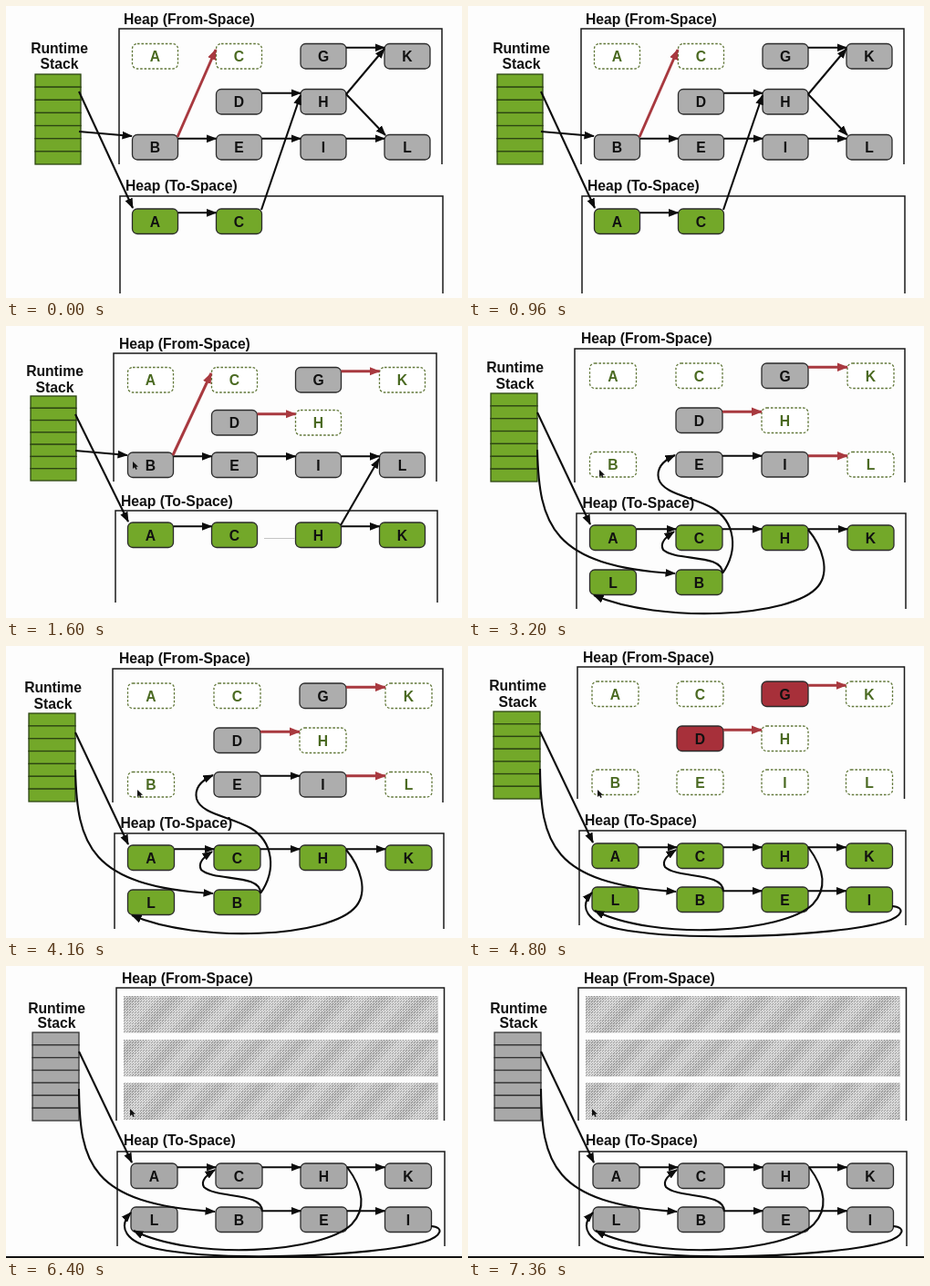
Recreate the animation shown at these times as an HTML page. Size 500x321 px, loop 8000 ms.

```html
<!DOCTYPE html>
<html lang="en">
<head>
<meta charset="utf-8">
<title>Copying collector</title>
<style>
  html, body { margin: 0; width: 100%; height: 100%; overflow: hidden; background: #fdfdfd; }
  svg { display: block; width: 100%; height: 100%; }
  text { font: bold 15.7px "Liberation Sans", Arial, sans-serif; fill: #111; }
  .mid { text-anchor: middle; }
  .frame { fill: none; stroke: #1a1a1a; stroke-width: 1.5; }
  .arrow { fill: none; stroke: #0c0c0c; stroke-width: 2.1; marker-end: url(#tip); }
  .arrow.red { stroke: #a8393f; stroke-width: 3; marker-end: url(#redTip); }
  .box { stroke: #2b2b2b; stroke-width: 1.3; }
  .moved { fill: #fff; stroke: #62783a; stroke-width: 1.3; stroke-dasharray: 2.6 1.8; }
  .ghost { fill: #4b6a22; }
</style>
</head>
<body>
<svg id="stage" viewBox="0 0 500 321" preserveAspectRatio="none">
  <defs>
    <marker id="tip" markerUnits="userSpaceOnUse" markerWidth="12" markerHeight="10" refX="10.5" refY="5" orient="auto">
      <path d="M0 .6L11.5 5L0 9.4Z" fill="#0c0c0c"/>
    </marker>
    <marker id="redTip" markerUnits="userSpaceOnUse" markerWidth="13" markerHeight="11" refX="11" refY="5.5" orient="auto">
      <path d="M0 .8L12 5.5L0 10.2Z" fill="#a8393f"/>
    </marker>
    <pattern id="fine" width="3" height="3" patternUnits="userSpaceOnUse">
      <rect width="3" height="3" fill="#cfcfcf"/>
      <path d="M0 0H1V1H0ZM1 2H2V3H1Z" fill="#8c8c8c"/>
    </pattern>
    <pattern id="streak" width="34" height="34" patternUnits="userSpaceOnUse" patternTransform="rotate(42)">
      <rect width="12" height="34" fill="#fff" opacity=".16"/>
      <rect x="20" width="8" height="34" fill="#555" opacity=".08"/>
    </pattern>
  </defs>
</svg>
<script>
const STEP = 1600;
const GREEN = '#73a829', GRAY = '#adadad', RED = '#a7303a', DULL = '#a8a8a8';
const stage = document.getElementById('stage');

function add(parent, tag, attrs, label) {
  const el = document.createElementNS('http://www.w3.org/2000/svg', tag);
  for (const key in attrs) el.setAttribute(key, attrs[key]);
  if (label) el.textContent = label;
  parent.append(el);
  return el;
}

// from/to: [left, top, right, bottom]; stack: [x, y, width, height]
// grid: three from-space rows, then to-space rows; lowercase cells have moved
const last = {
  from: [120, 23, 478.5, 168], to: [122, 203, 480, 307],
  title: [126, 17.5], toTitle: [128, 196.5],
  stack: [28, 72, 51, 96], label: [54.5, 49, 66.5],
  cols: [136, 229, 322, 414.5], rows: [39, 88, 136, 217, 265], w: 51,
  grid: ['acGk', '-Dh-', 'beil', 'ACHK', 'LBEI'],
  links: 'ACHBE', redLinks: 'GD', hot: 'GD', cursor: [142, 158],
  paths: [
    'M79 94L137 216',
    'M79 135C80 215 90 262 228 270',
    'M280 270C280 248 230 256 216 243C212 236 219 230 228 224',
    'M373 221C390 244 395 266 378 284C345 316 205 324 139 291',
    'M465 286C480 287 477 297 458 303C400 320 235 325 165 311C130 304 121 287 136 271'
  ]
};

const scenes = [
  {
    from: [124, 25, 478, 174], to: [125, 209, 479, 316],
    title: [129, 19.5], toTitle: [131, 202.5],
    stack: [32, 75, 50, 99], label: [58.5, 52, 69],
    cols: [138.5, 230.5, 323, 415], rows: [41.5, 91.5, 141.5, 223], w: 50,
    grid: ['acGK', '-DH-', 'BEIL', 'AC--'],
    links: 'GDBEIA', redLinks: '',
    paths: ['M80 94L139 222', 'M80 138L138 143', 'M373 97L415 47',
            'M373 97L416 142', 'M280 224L323 98'],
    redPaths: ['M188 144L230 48']
  },
  {
    from: [118, 30, 472, 171], to: [120, 203, 473, 304],
    title: [124, 24.5], toTitle: [126, 197.5],
    stack: [27, 77, 50, 93], label: [53.5, 55, 73],
    cols: [133.5, 225.5, 317.5, 409.5], rows: [45.5, 92.5, 139, 216], w: 50,
    grid: ['acGk', '-Dh-', 'BEIL', 'ACHK'],
    links: 'BEIAH', redLinks: 'GD', cursor: [139, 149],
    paths: ['M76 97L134 215', 'M76 137L133 142', 'M367 219L409 146'],
    redPaths: ['M183 142L225 52'], wisp: 'M283 233.5H317'
  },
  {
    from: [117, 25, 479, 172], to: [119, 206, 480, 311],
    title: [124, 18.5], toTitle: [125.5, 199.5],
    stack: [25, 74, 51, 97], label: [51.5, 50.5, 68.5],
    cols: [133.5, 228, 322, 416], rows: [41, 90, 138.5, 219, 268], w: 51,
    grid: ['acGk', '-Dh-', 'bEIl', 'ACHK', 'LB--'],
    links: 'EACH', redLinks: 'GDI', cursor: [144, 158],
    paths: [
      'M76 95L134 218',
      'M76 136C78 218 91 264 227 272',
      'M279 272C280 250 228 259 214 246C210 238 217 232 226 226',
      'M279 272C297 246 293 215 268 200C245 187 214 185 209 168C206 155 216 147 227 142',
      'M373 224C389 243 397 270 384 286C356 321 210 327 138 296'
    ]
  },
  last,
  {
    ...last,
    from: [121, 24, 480.5, 170], to: [122, 204, 481, 308],
    title: [127, 19], toTitle: [129, 197],
    stack: [29, 73, 51, 97], label: [55.5, 51.5, 67.5],
    cols: last.cols.map(x => x + 1),
    grid: ['', '', '', ...last.grid.slice(3)],
    redLinks: '', hot: '', cursor: [136, 157], swept: true, shift: 1
  }
];

function drawStack(g, s) {
  const [x, y, w, h] = s.stack, cell = h / 7;
  for (let i = 0; i < 7; i++) {
    add(g, 'rect', { x, y: y + i * cell, width: w, height: cell,
      fill: s.swept ? DULL : GREEN, stroke: s.swept ? '#333' : '#2c4412', 'stroke-width': 1.3 });
  }
  const [cx, top, bottom] = s.label;
  add(g, 'text', { x: cx, y: top, class: 'mid' }, 'Runtime');
  add(g, 'text', { x: cx, y: bottom, class: 'mid' }, 'Stack');
}

function drawSpace(g, [l, t, r, b], [x, y], name) {
  add(g, 'path', { d: `M${l} ${b}V${t}H${r}V${b}`, class: 'frame' });
  add(g, 'text', { x, y }, name);
}

function drawGrid(g, s) {
  s.grid.forEach((line, r) => [...line].forEach((ch, c) => {
    if (ch === '-') return;
    const name = ch.toUpperCase(), moved = ch !== name;
    const x = s.cols[c], y = s.rows[r];
    const fill = s.swept ? DULL : r > 2 ? GREEN : (s.hot || '').includes(ch) ? RED : GRAY;
    const box = { x, y, width: s.w, height: 27.5, rx: 5.5, class: moved ? 'moved' : 'box' };
    if (!moved) box.fill = fill;
    add(g, 'rect', box);
    add(g, 'text', { x: x + s.w / 2, y: y + 19.5, class: moved ? 'mid ghost' : 'mid' }, name);
  }));
}

function drawLinks(g, s) {
  s.grid.forEach((line, r) => [...line].forEach((ch, c) => {
    const red = s.redLinks.includes(ch);
    if (!red && !s.links.includes(ch)) return;
    const y = s.rows[r] + 4.3;
    add(g, 'path', { d: `M${s.cols[c] + s.w} ${y}H${s.cols[c + 1]}`, class: red ? 'arrow red' : 'arrow' });
  }));
  const curves = add(g, 'g', { transform: `translate(${s.shift || 0} 0)` });
  for (const d of s.paths) add(curves, 'path', { d, class: 'arrow' });
  for (const d of s.redPaths || []) add(curves, 'path', { d, class: 'arrow red' });
}

function drawSwept(g) {
  for (const y of [33, 81, 128.5]) {
    for (const id of ['fine', 'streak']) {
      add(g, 'rect', { x: 129, y, width: 345, height: 40.5, fill: `url(#${id})` });
    }
  }
  add(g, 'rect', { x: 0, y: 319, width: 500, height: 2, fill: '#111' });
}

function build(s) {
  const g = add(stage, 'g', { visibility: 'hidden' });
  drawSpace(g, s.from, s.title, 'Heap (From-Space)');
  drawSpace(g, s.to, s.toTitle, 'Heap (To-Space)');
  if (s.swept) drawSwept(g);
  drawStack(g, s);
  drawGrid(g, s);
  drawLinks(g, s);
  if (s.wisp) add(g, 'path', { d: s.wisp, stroke: '#c4c4c4' });
  if (s.cursor) {
    add(g, 'path', { d: 'M0 0V8L2 6.2L3.4 9L4.8 8.3L3.5 5.7H6Z', fill: '#111',
      transform: `translate(${s.cursor})` });
  }
  return g;
}

const layers = scenes.map(build);

function show(now) {
  const current = Math.floor(now / STEP) % layers.length;
  layers.forEach((g, i) => g.setAttribute('visibility', i === current ? 'visible' : 'hidden'));
}

function tick() {
  show(performance.now() - start);
  requestAnimationFrame(tick);
}

const start = performance.now();
tick();
</script>
</body>
</html>
```
